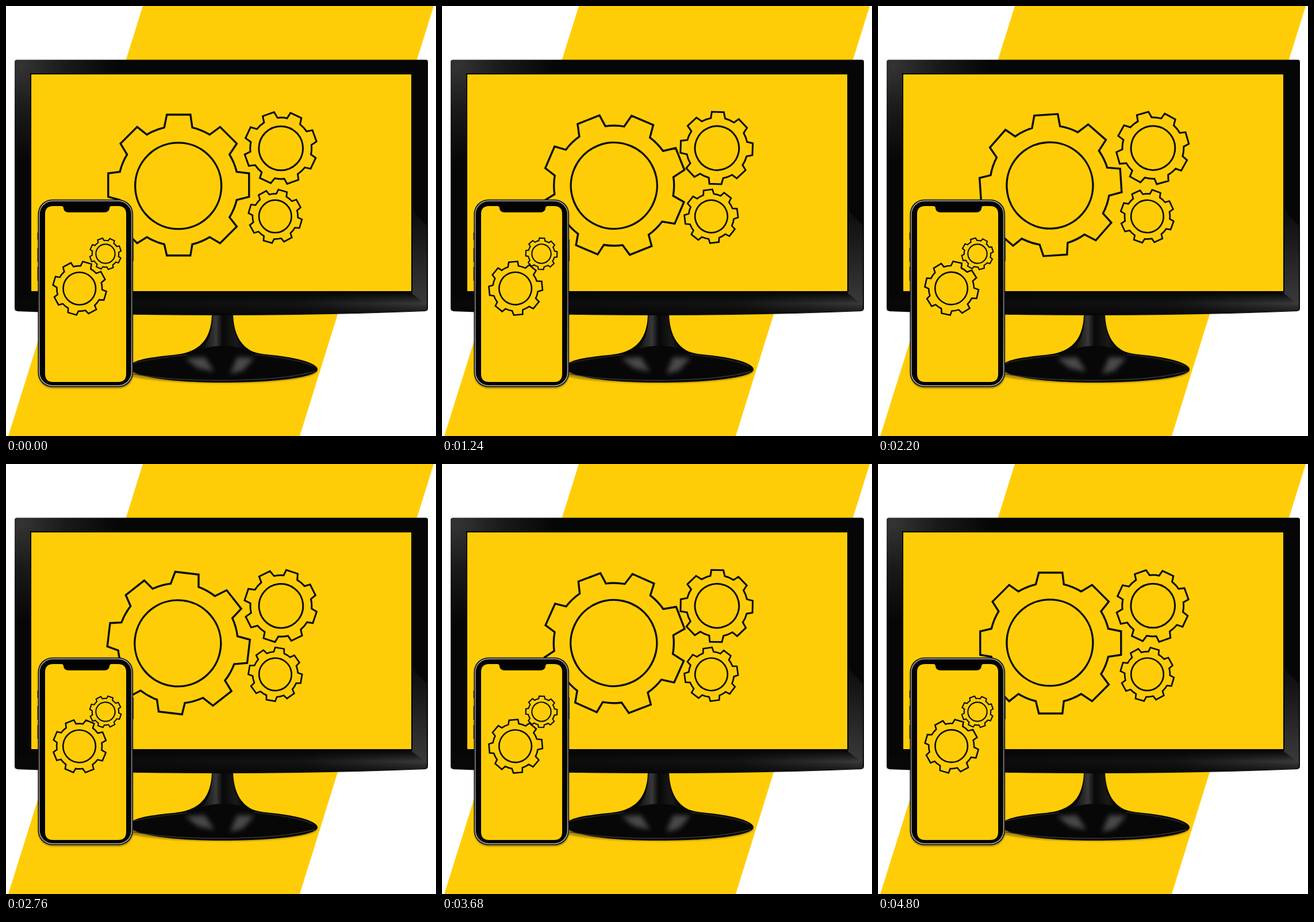
These frames come from a looping animation (748x748 px, 4.84 s). An HTML page:

```html
<!DOCTYPE html>
<html lang="en">
<head>
<meta charset="utf-8">
<title>Turning gears</title>
<style>
  html, body { margin: 0; width: 100%; height: 100%; overflow: hidden; background: #fff; }
  svg { display: block; width: 100%; height: 100%; }
  .gear { fill: none; stroke: #080b0e; stroke-linejoin: miter; }
  .yellow { fill: #ffcd08; }
</style>
</head>
<body>
<svg viewBox="0 0 748 748">
  <defs>
    <radialGradient id="cornerGlow" gradientUnits="userSpaceOnUse" cx="26" cy="104" r="170">
      <stop offset="0" stop-color="#343434"/>
      <stop offset=".45" stop-color="#1a1a1a"/>
      <stop offset="1" stop-color="#060606"/>
    </radialGradient>
    <linearGradient id="sideGlow" x2="0" y2="1">
      <stop offset="0" stop-color="#0c0c0c"/>
      <stop offset="1" stop-color="#3a3a3a"/>
    </linearGradient>
    <linearGradient id="bottomGlow">
      <stop offset="0" stop-color="#080808"/>
      <stop offset=".7" stop-color="#141414"/>
      <stop offset="1" stop-color="#3a3a3a"/>
    </linearGradient>
    <linearGradient id="bottomShade" x2="0" y2="1">
      <stop offset="0" stop-color="#050505"/>
      <stop offset=".5" stop-color="#050505" stop-opacity="0"/>
      <stop offset="1" stop-color="#050505" stop-opacity=".8"/>
    </linearGradient>
    <linearGradient id="neck">
      <stop offset="0" stop-color="#050505"/>
      <stop offset=".35" stop-color="#383838"/>
      <stop offset=".5" stop-color="#080808"/>
      <stop offset=".8" stop-color="#1a1a1a"/>
      <stop offset="1" stop-color="#050505"/>
    </linearGradient>
    <linearGradient id="rim" x2="0" y2="1">
      <stop offset="0" stop-color="#a9a8a4"/>
      <stop offset=".5" stop-color="#7b7a73"/>
      <stop offset="1" stop-color="#b9b8b0"/>
    </linearGradient>
    <filter id="soft" x="-20%" y="-30%" width="140%" height="160%"><feGaussianBlur stdDeviation="1.5"/></filter>
    <filter id="softer" x="-30%" y="-30%" width="160%" height="160%"><feGaussianBlur stdDeviation="4"/></filter>
  </defs>

  <path class="yellow" d="M238 0H744L511 748H4Z"/>

  <!-- Monitor stand -->
  <path filter="url(#soft)" opacity=".3" d="M190 633C210 664 550 664 542 633Z"/>
  <path fill="#070707" d="M358 536H395C396 570 408 591 429 601C446 607 462 606 485 610
    C519 615 542 624 542 632C542 646 465 655 381 655C290 655 215 645 215 629
    C215 616 250 611 290 607C326 604 357 590 358 536Z"/>
  <path fill="url(#neck)" d="M359 538H394C395 568 402 585 416 597Q380 585 338 597C352 586 359 568 359 538Z"/>
  <g filter="url(#softer)" fill="#4a4a4a">
    <path d="M312 613L346 611L362 636L334 630Z"/>
    <path d="M432 612L402 611L390 640L412 634Z"/>
  </g>
  <path fill="none" stroke="#363636" stroke-width="1.5" d="M222 640C300 655 460 656 537 636"/>
  <path fill="none" stroke="#202020" stroke-width="2" d="M432 606C485 612 520 618 534 627M222 621Q260 612 315 607"/>

  <!-- Monitor -->
  <path filter="url(#soft)" opacity=".3" d="M20 530Q375 544 729 530V520H20Z"/>
  <path fill="url(#cornerGlow)" d="M19 93.5H730Q734 93.5 734 97V526Q734 530 729 531Q560 538 375 538Q190 538 20 531Q15 530 15 526V97Q15 93.5 19 93.5Z"/>
  <path fill="#060606" d="M210 95H731V118H244Q217 112 210 95Z"/>
  <g id="bottomBezel">
    <path id="bottomEdge" fill="url(#bottomGlow)" d="M20 498H732V526Q732 529 729 530Q560 537 375 537Q190 537 20 530Z"/>
    <use href="#bottomEdge" style="fill: url(#bottomShade)"/>
    <path fill="url(#bottomShade)" d="M20 498H732V526Q732 529 729 530Q560 537 375 537Q190 537 20 530Z"/>
  </g>
  <path fill="url(#sideGlow)" d="M706 355L732 382V520L706 500Z"/>
  <rect x="42" y="117" width="665" height="381" fill="#040404"/>
  <rect class="yellow" x="44" y="119" width="661" height="377"/>
  <g id="monitorGears"></g>

  <!-- Phone -->
  <rect x="56" y="340" width="165" height="325" rx="25" opacity=".4" filter="url(#soft)"/>
  <path fill="none" stroke="#333" stroke-width="2" d="M55.5 394V407M55.5 421V445M55.5 454V478M221 406V444"/>
  <rect x="55.5" y="336.5" width="165.5" height="326.5" rx="25" fill="#1c1c1a"/>
  <rect x="58" y="339" width="160.5" height="321.5" rx="23" fill="#030303" stroke="url(#rim)" stroke-width="1.5"/>
  <path class="yellow" d="M82 348H96Q100 348 100 352Q101 359 109 359H171Q179 359 180 352Q180 348 184 348H195Q209 348 209 362V640Q209 654 195 654H82Q68 654 68 640V362Q68 348 82 348Z"/>
  <g id="phoneGears"></g>
</svg>
<script>
const STEP = 40, STEPS = 121, DEGREES_PER_STEP = 0.75;

// Sizes are relative to the largest gear; dx and dy shift the ring and the valleys off the pivot.
const gears = [
  { parent: "monitorGears", x: 300.3, y: 311.5, size: 1, start: 0, turn: 1, line: 3.4, dx: -0.6, dy: 1.4 },
  { parent: "monitorGears", x: 477.7, y: 247, size: 0.511, start: 25.2, turn: -1, line: 3, dx: 0.5, dy: 0.5 },
  { parent: "monitorGears", x: 468.3, y: 365.8, size: 0.377, start: 16.3, turn: -1, line: 2.7, dx: 0, dy: 0.2 },
  { parent: "phoneGears", x: 128.2, y: 491, size: 0.377, start: 16.3, turn: 1, line: 2.6, dx: -0.4, dy: 0.5 },
  { parent: "phoneGears", x: 173, y: 431, size: 0.222, start: 25.2, turn: -1, line: 2.1, dx: 0, dy: 0 },
];

function gearPath({ size, start, dx, dy }) {
  const point = (radius, degrees, x = 0, y = 0) => {
    const a = (start + degrees) * Math.PI / 180;
    return `${x + radius * size * Math.sin(a)} ${y - radius * size * Math.cos(a)}`;
  };
  const tip = degrees => point(124.2, degrees);
  const base = degrees => point(104.5, degrees, dx, dy);
  const valley = 104.5 * size;
  let d = `M${base(-13.5)}`;
  for (let a = 0; a < 360; a += 45) {
    d += `L${tip(a - 9.5)}L${tip(a + 9.5)}L${base(a + 13.5)}`;
    d += `A${valley} ${valley} 0 0 1 ${base(a + 31.5)}`;
  }
  return d + "Z";
}

function add(parent, tag, attributes) {
  const node = document.createElementNS("http://www.w3.org/2000/svg", tag);
  for (const name in attributes) node.setAttribute(name, attributes[name]);
  return parent.appendChild(node);
}

for (const g of gears) {
  g.node = add(document.getElementById(g.parent), "g", { class: "gear", "stroke-width": g.line });
  add(g.node, "path", { d: gearPath(g) });
  add(g.node, "circle", { cx: g.dx, cy: g.dy, r: 75 * g.size });
}

function draw() {
  const angle = Math.floor(performance.now() / STEP) % STEPS * DEGREES_PER_STEP;
  for (const g of gears) {
    g.node.setAttribute("transform", `translate(${g.x} ${g.y}) rotate(${g.turn * angle})`);
  }
  requestAnimationFrame(draw);
}
draw();
</script>
</body>
</html>
```
